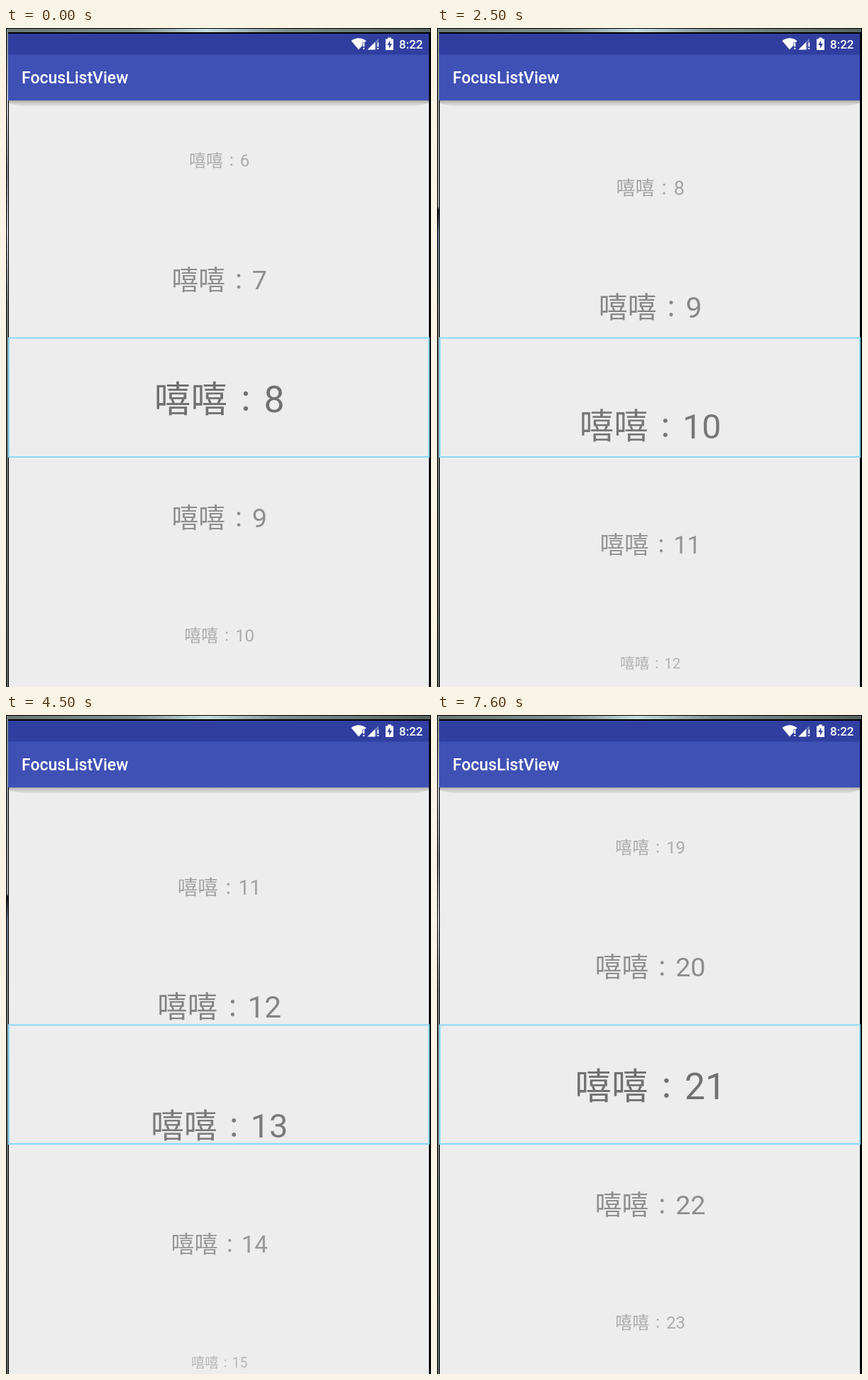
These frames come from a looping animation (599 by 928 pixels, 7.7 s). An HTML page:

```html
<!DOCTYPE html>
<html lang="ja">
<head>
<meta charset="utf-8">
<title>FocusListView</title>
<style>
  html, body { margin: 0; width: 100%; height: 100%; overflow: hidden; background: #000; }
  svg { display: block; width: 599px; height: 928px; }
  text { font-family: Roboto, "Noto Sans CJK JP", "Noto Sans CJK TC", sans-serif; }
  .row { fill: #717171; text-anchor: middle; }
  .colon { font-size: .82em; }
  .bar { fill: #fff; font-weight: 500; }
</style>
</head>
<body>
<svg viewBox="0 0 599 928">
  <defs>
    <linearGradient id="desk">
      <stop offset="0" stop-color="#6a7674"/>
      <stop offset=".3" stop-color="#7f8f8e"/>
      <stop offset=".47" stop-color="#c3dcdd"/>
      <stop offset=".65" stop-color="#7f9090"/>
      <stop offset="1" stop-color="#56625f"/>
    </linearGradient>
    <linearGradient id="sideA" x2="0" y2="1">
      <stop offset="0" stop-color="#7c8785"/>
      <stop offset=".12" stop-color="#c6c6d0"/>
      <stop offset=".22" stop-color="#85888f"/>
      <stop offset=".31" stop-color="#d2d2e0"/>
      <stop offset=".42" stop-color="#77827d"/>
      <stop offset="1" stop-color="#5f6c65"/>
    </linearGradient>
    <linearGradient id="sideB" x2="0" y2="1">
      <stop offset="0" stop-color="#7c8785"/>
      <stop offset=".27" stop-color="#a3a7aa"/>
      <stop offset=".275" stop-color="#15181c"/>
      <stop offset=".31" stop-color="#6c7894"/>
      <stop offset=".42" stop-color="#77827d"/>
      <stop offset="1" stop-color="#5f6c65"/>
    </linearGradient>
    <linearGradient id="shade" x2="0" y2="1">
      <stop offset="0" stop-color="#000" stop-opacity=".28"/>
      <stop offset=".45" stop-color="#000" stop-opacity=".14"/>
      <stop offset="1" stop-color="#000" stop-opacity=".05"/>
    </linearGradient>
    <clipPath id="list"><rect x="4" y="102" width="592" height="826"/></clipPath>
  </defs>

  <rect width="599" height="928" fill="#000"/>
  <rect x="1" y="1" width="597" height="5" fill="url(#desk)"/>
  <rect id="side" x="1" y="1" width="2" height="927"/>
  <rect x="4" y="102" width="592" height="826" fill="#ededed"/>

  <g id="rows" clip-path="url(#list)"></g>
  <rect x="4" y="436.5" width="592" height="167.5" fill="none" stroke="#8bd9f8" stroke-width="2"/>

  <path d="M4 102H596V106L578 110H22L4 106Z" fill="url(#shade)"/>
  <rect x="3" y="8" width="593" height="30" fill="#303f9f"/>
  <rect x="3" y="37.5" width="593" height="64.5" fill="#3f51b5"/>
  <text class="bar" x="22" y="78" font-size="23">FocusListView</text>

  <g fill="#fff">
    <path d="M486.5 18Q497 10.5 507.5 18L506 20H502.5V24.5L497 30.5Z"/>
    <path d="M503.3 20.5h2v6h-2zM503.3 28h2v2h-2z"/>
    <path d="M525 15V20H522V30.5H509.5Z" opacity=".35"/>
    <path d="M520 20V30.5H509.5Z"/>
    <path d="M523.3 20.5h2v6h-2zM523.3 28h2v2h-2z"/>
    <path d="M538 13.5h5v2h3v15.5h-11V15.5h3z"/>
    <path d="M541.3 17.5L537.3 24H540V29L544 22.3H541.3Z" fill="#303f9f"/>
  </g>
  <text class="bar" x="554" y="29" font-size="17">8:22</text>
</svg>
<script>
const LOOP = 7700, STEP = 100;
const CENTER = 520.3, PITCH = 167.3, FONT = 51.6, SHRINK = 0.268, FADE = 0.24;

const smooth = u => u * u * (3 - 2 * u);
const smoother = u => u ** 3 * (u * (6 * u - 15) + 10);
const easeOut = u => 1 - (1 - u) ** 2.63;

// Scroll position is counted in rows; each move continues from where the last one aimed.
const START_ROW = 8;
const moves = [
  { at: 800, ms: 1500, to: 9, ease: smooth },
  { at: 2200, ms: 700, to: 10, ease: easeOut },
  { at: 3200, ms: 830, to: 11.09, ease: smooth },
  { at: 4000, ms: 300, to: 11, ease: smooth },
  { at: 4400, ms: 500, to: 27, ease: smooth },
  { at: 5500, ms: 900, to: 20.61, ease: smoother },
  { at: 6400, ms: 800, to: 21, ease: smooth }
];

const NS = "http://www.w3.org/2000/svg";
const side = document.getElementById("side");

function add(parent, name, attrs, text = "") {
  const el = document.createElementNS(NS, name);
  set(el, attrs);
  el.textContent = text;
  parent.append(el);
  return el;
}

function set(el, attrs) {
  for (const key in attrs) el.setAttribute(key, attrs[key]);
}

const rows = Array.from({ length: 7 }, () => {
  const el = add(document.getElementById("rows"), "text", { class: "row" }, "嘻嘻");
  add(el, "tspan", { class: "colon", dx: ".11em" }, "：");
  return { el, num: add(el, "tspan", { dx: ".09em" }) };
});

function scrollAt(t) {
  let pos = START_ROW;
  for (const [i, m] of moves.entries()) {
    if (t < m.at) break;
    const from = i ? moves[i - 1].to : START_ROW;
    pos = from + (m.to - from) * m.ease(Math.min(1, (t - m.at) / m.ms));
  }
  return pos;
}

function draw(time) {
  const t = Math.floor(time / STEP) * STEP;
  const pos = scrollAt(t), first = Math.round(pos) - 3;
  rows.forEach(({ el, num }, i) => {
    const n = first + i, d = n - pos, far = Math.abs(d);
    const size = FONT * (1 - SHRINK * far);
    num.textContent = n;
    set(el, {
      x: 300.7,
      y: CENTER + d * PITCH + size * 0.4,
      "font-size": Math.max(1, size),
      opacity: 1 - FADE * far
    });
  });
  set(side, { fill: t >= 700 && t < 7600 ? "url(#sideB)" : "url(#sideA)" });
}

const begin = performance.now();
function tick() {
  draw((performance.now() - begin) % LOOP);
  requestAnimationFrame(tick);
}
tick();
</script>
</body>
</html>
```
